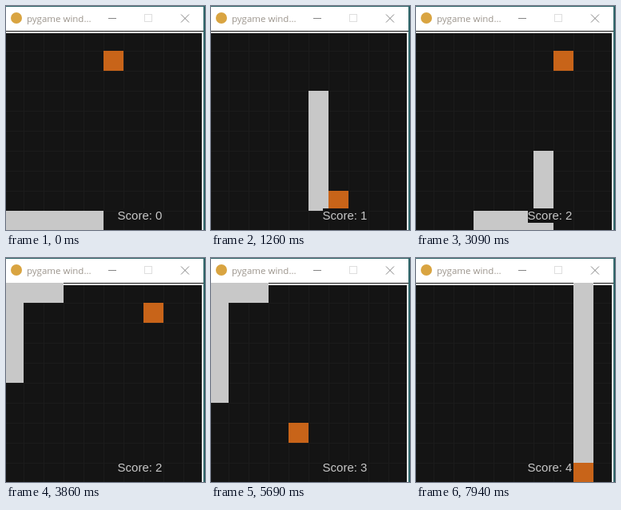
Write an HTML page that moves like this. It is 249 px wide and 280 px high and loops after 8000 ms.

```html
<!DOCTYPE html>
<html lang="en">
<head>
<meta charset="utf-8">
<title>Snake</title>
<style>
  html, body { margin: 0; width: 100%; height: 100%; overflow: hidden; background: #fff; }
  svg { display: block; width: 100%; height: 100%; }
  .crisp { shape-rendering: crispEdges; }
  .title { font: 11.5px "Open Sans", "Noto Sans", sans-serif; fill: #9c958d; }
  .score { font: 15px "Liberation Sans", Arial, sans-serif; fill: #c8c8c8; }
</style>
</head>
<body>
<svg viewBox="0 0 249 280">
  <rect width="249" height="280" fill="#fff"/>
  <circle cx="13" cy="15" r="7" fill="#d9a441"/>
  <text class="title" x="26" y="20">pygame wind...</text>
  <path class="crisp" d="M128 15h10v1h-10z" fill="#858585"/>
  <rect x="173.5" y="10.5" width="9" height="9" fill="none" stroke="#dedede"/>
  <path d="M219 10.5l10 10m0-10l-10 10" stroke="#858585" fill="none"/>

  <g class="crisp">
    <rect y="31" width="247" height="249" fill="#141414"/>
    <path id="grid" fill="none" stroke="#1b1b1b"/>
    <path d="M0 32h247v248h-2V34H0z" fill="#fff"/>
    <path id="snake" fill="#c8c8c8"/>
    <path id="food" fill="#c86419"/>
    <rect x="140" y="253" width="55" height="18" fill="#141414"/>
    <path d="M0 0h249v280h-2V1H0z" fill="#2f6569"/>
  </g>
  <text class="score" id="score" x="139.6" y="267"></text>
</svg>
<script>
const LOOP = 8000, MOVE = 56.25, PHASE = 0.45, LAST = 113;
const CELL = 25, LEFT = -3, TOP = 31, START_LEN = 5;
const foods = [[5, 1], [6, 8], [7, 1], [4, 7], [8, 9]];
const $ = id => document.getElementById(id);

// Each lap: left along the floor, up the wall, right along the top, down the food's column.
const path = [[4, 9]];
const eatenAt = [];

function walkTo(x, y) {
  let [cx, cy] = path[path.length - 1];
  while (cx !== x || cy !== y) {
    cx += Math.sign(x - cx);
    cy += Math.sign(y - cy);
    path.push([cx, cy]);
    const [fx, fy] = foods[eatenAt.length] || [];
    if (cx === fx && cy === fy) eatenAt.push(path.length - START_LEN);
  }
}

for (const [col] of foods) {
  walkTo(0, 9);
  walkTo(0, 0);
  walkTo(col, 0);
  walkTo(col, 9);
}

const square = ([x, y]) =>
  `M${LEFT + x * CELL} ${TOP + y * CELL}h${CELL}v${CELL}h${-CELL}z`;

// The screen refreshes a little slower than the snake moves.
const refresh = n => 70 * n + 10 * (Math.floor((n + 10) / 27) - (n > 5 ? 1 : 0));

function shownTime(t) {
  let n = Math.min(LAST, Math.floor(t / 70) + 1);
  while (n > 0 && refresh(n) > t) n--;
  return n ? refresh(n) : 0;
}

function draw(t) {
  const move = Math.floor(shownTime(t) / MOVE + PHASE);
  const score = eatenAt.filter(m => m <= move).length;
  const head = move + START_LEN;
  const body = path.slice(head - START_LEN - score, head);
  $('snake').setAttribute('d', body.map(square).join(''));
  $('food').setAttribute('d', square(foods[score]));
  $('score').textContent = 'Score: ' + score;
}

let lines = '';
for (let i = 1; i < 10; i++) {
  lines += `M${LEFT + i * CELL + 0.5} ${TOP}v249M0 ${TOP + i * CELL + 0.5}h247`;
}
$('grid').setAttribute('d', lines);

const begin = performance.now();
function tick() {
  draw((performance.now() - begin) % LOOP);
  requestAnimationFrame(tick);
}
tick();
</script>
</body>
</html>
```
